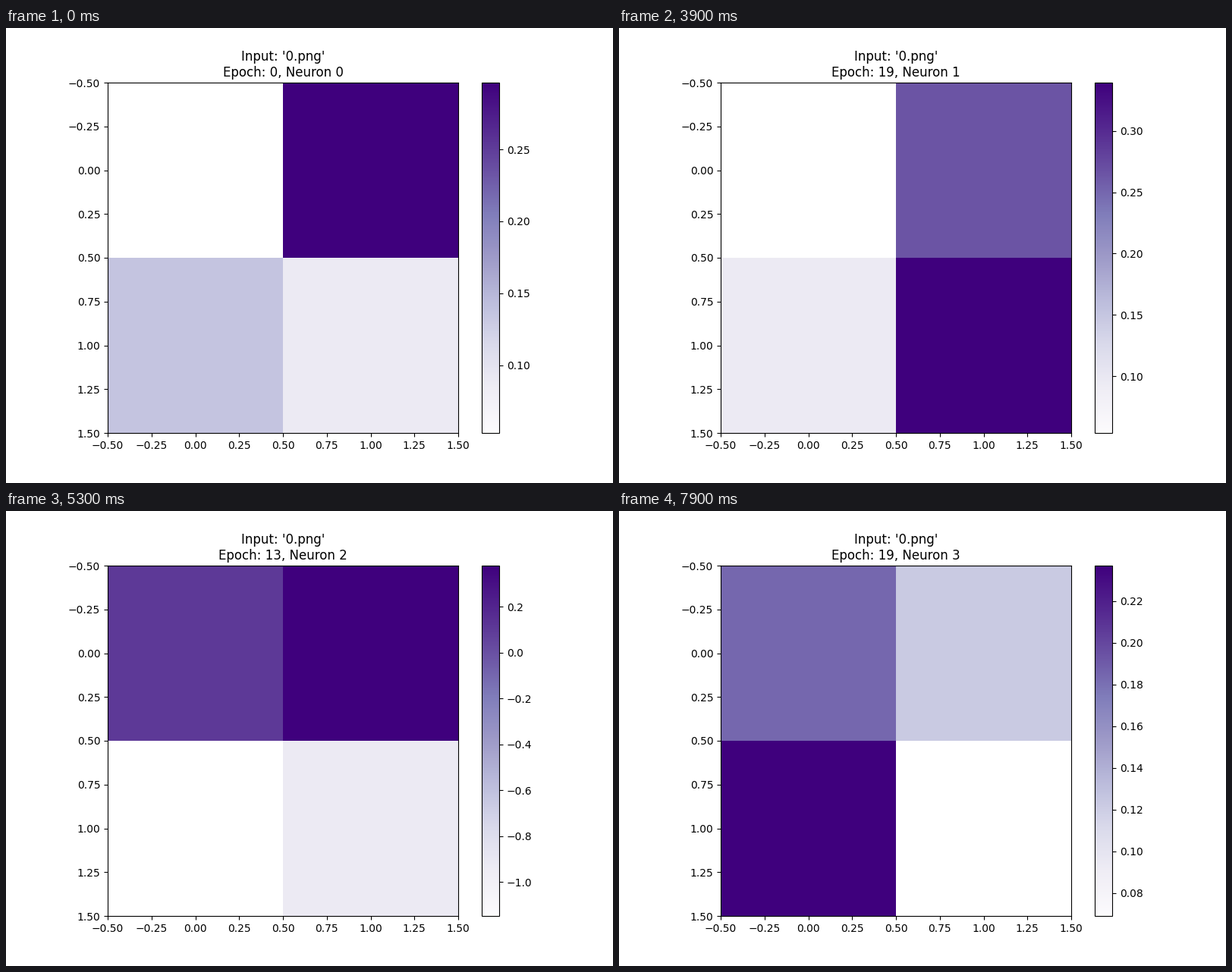
A matplotlib script that plays this animation: 800 px wide and 600 px high, repeating every 8 s.

```python
import numpy as np
import matplotlib.pyplot as plt
from matplotlib.animation import FuncAnimation
from matplotlib.colors import ListedColormap

EPOCHS = 20


def cells(ranks, high, deep, low=0.053, pale=1 / 7):
    """2x2 weights; ranks pick low, pale, deep or high for each cell in turn."""
    shades = np.array([0, pale, deep, 1])
    return low + (high - low) * shades[ranks].reshape(2, 2)


def decay(epoch):
    """Eased drop of the winning neuron's weights."""
    return 1.9031 * (1 - np.exp(-0.094 * max(epoch - 1, 0) ** 0.95))


neurons = [
    cells([0, 3, 2, 1], high=0.2964, deep=0.34),
    cells([0, 2, 1, 3], high=0.3393, deep=0.74, low=0.0538),
    cells([1, 3, 0, 2], high=0.3793, deep=0.66),
    cells([2, 1, 3, 0], high=0.2369, deep=0.685, low=0.0690, pale=0.32),
]
winner = 2
inputs = np.array([[0], [1]])  # only the lower row is lit

# Purples with a pure white lowest step
shades = plt.get_cmap("Purples")(np.linspace(0, 1, 256))
shades[0] = 1

fig, ax = plt.subplots(figsize=(8, 6), dpi=100)
image = ax.imshow(neurons[0], cmap=ListedColormap(shades), interpolation="nearest")
fig.colorbar(image, ax=ax)
title = ax.set_title("")


def update(i):
    n, epoch = divmod(i, EPOCHS)
    w = neurons[n] - (n == winner) * decay(epoch) * inputs
    image.set_data(w)
    image.set_clim(w.min(), w.max())
    title.set_text(f"Input: '0.png'\nEpoch: {epoch}, Neuron {n}")
    return image, title


anim = FuncAnimation(fig, update, frames=EPOCHS * len(neurons), interval=100,
                     repeat=True, repeat_delay=0, blit=False)
plt.show()
```
